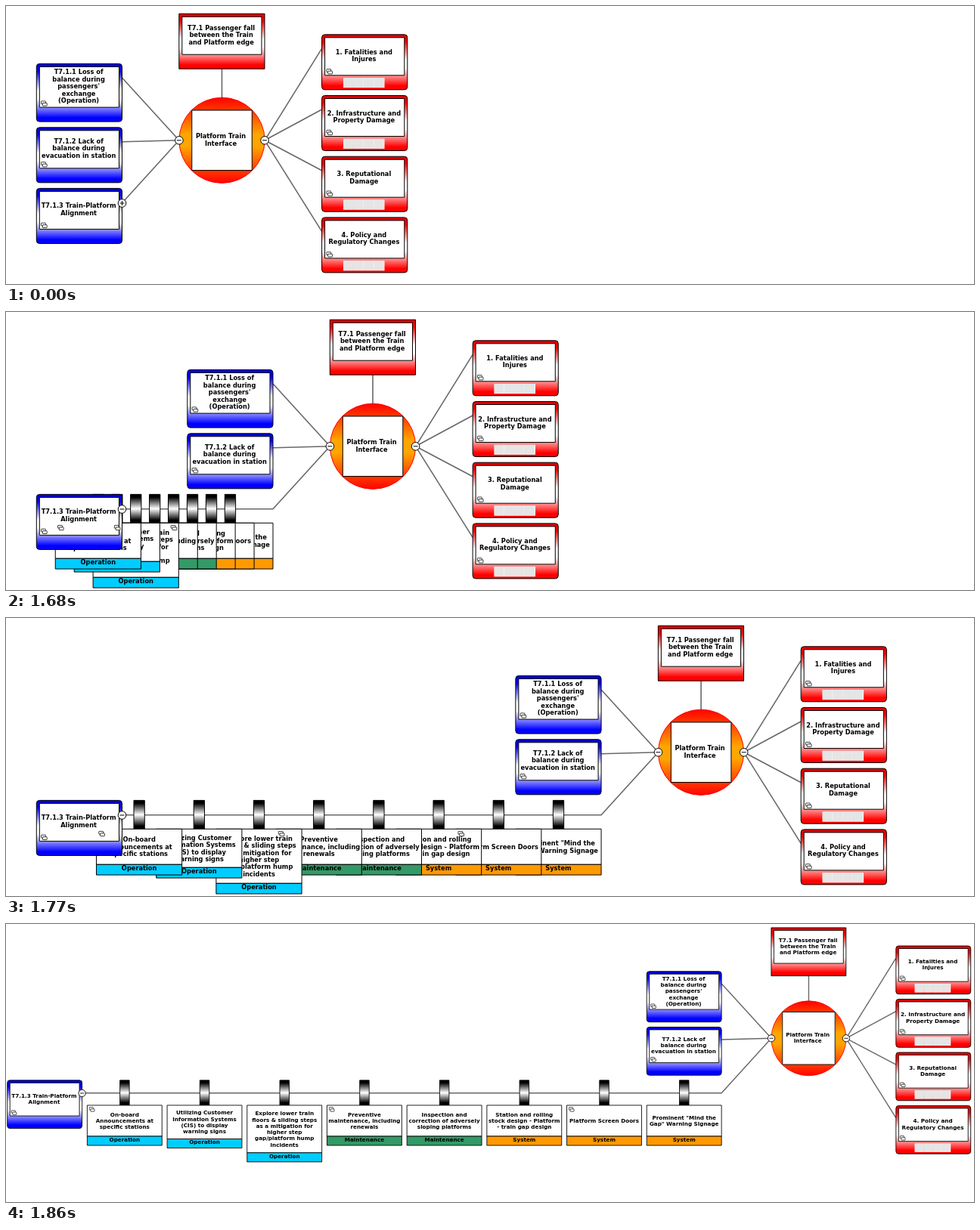
An HTML page with a canvas that plays this animation: 1280 px wide and 368 px high, repeating every 3190 ms.

```html
<!DOCTYPE html>
<html lang="en">
<head>
<meta charset="utf-8">
<title>Bow-tie diagram</title>
<style>
  html, body { margin: 0; width: 100%; height: 100%; overflow: hidden; background: #fff; }
  canvas { display: block; }
</style>
</head>
<body>
<canvas id="stage" width="1280" height="368"></canvas>
<script>
const ctx = document.getElementById('stage').getContext('2d');

const LOOP = 3190, OPEN_AT = 1560, STEP = 30, LAST_STEP = 10;
const SPACING = 121, CARD_W = 113.2, CARD_H = 73, DIAGRAM_W = 490.5;
const LINE_H = 9.45, LINE_COLOR = '#686868';
const BLUE = { edge: '#0000dc', main: '#0000ff' };
const RED = { edge: '#dc0000', main: '#ff0000' };
const LABEL_COLORS = { Operation: '#00ccff', Maintenance: '#339966', System: '#ff9900' };

const consequences = [
  ['1. Fatalities and', 'Injures'],
  ['2. Infrastructure and', 'Property Damage'],
  ['3. Reputational', 'Damage'],
  ['4. Policy and', 'Regulatory Changes']
];

const barriers = [
  { label: 'Operation', hasIcon: true, lines: ['On-board', 'Announcements at', 'specific stations'] },
  { label: 'Operation', body: 51, lines: ['Utilizing Customer', 'Information Systems', '(CIS) to display', 'warning signs'] },
  { label: 'Operation', body: 72, lines: ['Explore lower train', 'floors & sliding steps', 'as a mitigation for', 'higher step', 'gap/platform hump', 'incidents'] },
  { label: 'Maintenance', hasIcon: true, lines: ['Preventive', 'maintenance, including', 'renewals'] },
  { label: 'Maintenance', lines: ['Inspection and', 'correction of adversely', 'sloping platforms'] },
  { label: 'System', lines: ['Station and rolling', 'stock design - Platform', '- train gap design'] },
  { label: 'System', hasIcon: true, lines: ['Platform Screen Doors'] },
  { label: 'System', lines: ['Prominent "Mind the', 'Gap" Warning Signage'] }
];

function vertical(y, h, ...stops) {
  const gradient = ctx.createLinearGradient(0, y, 0, y + h);
  for (const [at, color] of stops) gradient.addColorStop(at, color);
  return gradient;
}

function box(x, y, w, h, fill, radius = 0, border = 1) {
  ctx.beginPath();
  ctx.roundRect(x, y, w, h, radius);
  ctx.fillStyle = fill;
  ctx.fill();
  ctx.strokeStyle = '#000';
  ctx.lineWidth = border;
  ctx.stroke();
}

function line(...points) {
  ctx.beginPath();
  for (const [x, y] of points) ctx.lineTo(x, y);
  ctx.strokeStyle = LINE_COLOR;
  ctx.lineWidth = 1.6;
  ctx.stroke();
}

function text(lines, cx, cy) {
  ctx.fillStyle = '#000';
  const first = cy + 3 - (lines.length - 1) * LINE_H / 2;
  lines.forEach((s, i) => ctx.fillText(s, cx, first + i * LINE_H));
}

function icon(x, y) {
  box(x, y, 5.8, 3.8, '#fff', 0.5, 0.75);
  box(x + 1.8, y + 2.5, 5.8, 3.8, '#fff', 0.5, 0.75);
}

function button(x, y, plus) {
  ctx.beginPath();
  ctx.arc(x, y, 5.3, 0, 2 * Math.PI);
  ctx.fillStyle = '#fff';
  ctx.fill();
  ctx.strokeStyle = '#000';
  ctx.lineWidth = 1;
  ctx.stroke();
  ctx.beginPath();
  ctx.moveTo(x - 3, y);
  ctx.lineTo(x + 3, y);
  if (plus) {
    ctx.moveTo(x, y - 3);
    ctx.lineTo(x, y + 3);
  }
  ctx.stroke();
}

function card(x, y, h, tone, lines, textY, { radius = 4, hasIcon = true } = {}) {
  const fill = vertical(y, h, [0, tone.edge], [0.13, tone.main], [0.46, '#fff'], [0.61, '#fff'], [0.93, tone.main], [1, tone.main]);
  box(x, y, CARD_W, h, fill, radius);
  box(x + 4, y + 4, 105.2, h - 23, '#fff');
  text(lines, x + CARD_W / 2 - 0.8, textY);
  if (hasIcon) icon(x + 6.3, y + h - 27.2);
}

function consequence(x, y, lines) {
  card(x, y, CARD_H, RED, lines, y + 27.8);
  for (let i = 0; i < 4; i++) {
    ctx.fillStyle = '#fff';
    ctx.fillRect(x + 28.5 + i * 13.6, y + 57.3, 13.6, 13);
    ctx.fillStyle = '#e5e5e5';
    ctx.fillRect(x + 28.5 + i * 13.6, y + 57.3, 12.9, 13);
  }
}

function barrier(x, { label, lines, body = 47 }) {
  const top = 279.3, labelH = 13.8;
  box(x + 49.5, 241.4, 14.3, 37.9, vertical(241.4, 37.9, [0, '#000'], [0.1, '#000'], [0.5, '#fff'], [0.9, '#000'], [1, '#000']));
  box(x, top, CARD_W, body, '#fff');
  box(x, top + body, CARD_W, labelH, LABEL_COLORS[label]);
  text(lines, x + CARD_W / 2, top + body / 2);
  text([label], x + CARD_W / 2, top + body + 4.7);
}

// Everything except the expandable threat; moves right as the row opens.
function mainDiagram(shift) {
  const hub = shift + 245.2, left = hub - 56.6, right = hub + 56.6, hubY = 177.8;
  const threatX = shift + CARD_W, effectX = shift + 377.3;
  const effectY = i => 37.8 + i * 80.7;

  line([threatX, 95], [left, hubY]);
  line([threatX, 179.7], [left, hubY]);
  line([CARD_W, 260.7], [threatX, 260.7], [left, hubY]);
  line([hub, 83], [hub, 122]);
  consequences.forEach((_, i) => line([right, hubY], [effectX, effectY(i) + 18.5]));

  ctx.beginPath();
  ctx.arc(hub, hubY, 56.6, 0, 2 * Math.PI);
  ctx.fillStyle = vertical(121, 114, [0, '#f00'], [0.43, '#ffa500'], [0.57, '#ffa500'], [1, '#f00']);
  ctx.fill();
  ctx.strokeStyle = '#f00';
  ctx.lineWidth = 1;
  ctx.stroke();
  box(hub - 39.7, 138, 79.5, 79.5, '#fff');
  text(['Platform Train', 'Interface'], hub - 1.5, 177);

  card(shift + 188.5, 10.2, CARD_H, RED, ['T7.1 Passenger fall', 'between the Train', 'and Platform edge'], 38.3,
    { radius: 0, hasIcon: false });
  card(shift, 76.4, 76.7, BLUE, ['T7.1.1 Loss of', 'balance during', "passengers'", 'exchange', '(Operation)'], 106.1);
  card(shift, 160.8, CARD_H, BLUE, ['T7.1.2 Lack of', 'balance during', 'evacuation in station'], 188.1);
  consequences.forEach((lines, i) => consequence(effectX, effectY(i), lines));
  button(left, hubY);
  button(right, hubY);
}

function draw(time) {
  const opened = time >= OPEN_AT;
  const step = Math.min(LAST_STEP, Math.floor((time - OPEN_AT) / STEP));
  let progress = 0;
  if (step >= LAST_STEP) progress = 1;
  else if (step >= 2) progress = (step - 1) / 10;
  else if (step === 1) progress = 0.05;

  const spacing = SPACING * (1 - Math.cos(Math.PI * progress)) / 2;
  const shift = barriers.length * spacing;
  const width = DIAGRAM_W + shift;

  ctx.setTransform(1, 0, 0, 1, 0, 0);
  ctx.fillStyle = '#fff';
  ctx.fillRect(0, 0, 1280, 368);
  ctx.font = 'bold 8.25px "DejaVu Sans", sans-serif';
  ctx.textAlign = 'center';

  // Scroll to the left edge when the diagram gets too wide, then zoom out to fit.
  const zoom = Math.min(1, 1274 / width);
  if (zoom < 1) {
    ctx.translate(1.7, 4.9);
    ctx.scale(zoom, zoom);
    ctx.translate(0, -10.2);
  } else {
    ctx.translate(width + 40 > 1278 ? 2.2 : 40.3, 0);
  }

  mainDiagram(shift);
  if (opened) {
    for (let k = barriers.length; k > 0; k--) barrier(k * spacing, barriers[k - 1]);
  }
  card(0, 241.4, CARD_H, BLUE, ['T7.1.3 Train-Platform', 'Alignment'], 269.1);
  if (opened) {
    barriers.forEach((b, i) => { if (b.hasIcon) icon((i + 1) * spacing + 3.3, 282.4); });
  }
  button(CARD_W, 261, !opened);
}

const start = performance.now();
function tick() {
  draw((performance.now() - start) % LOOP);
  requestAnimationFrame(tick);
}
tick();
</script>
</body>
</html>
```
